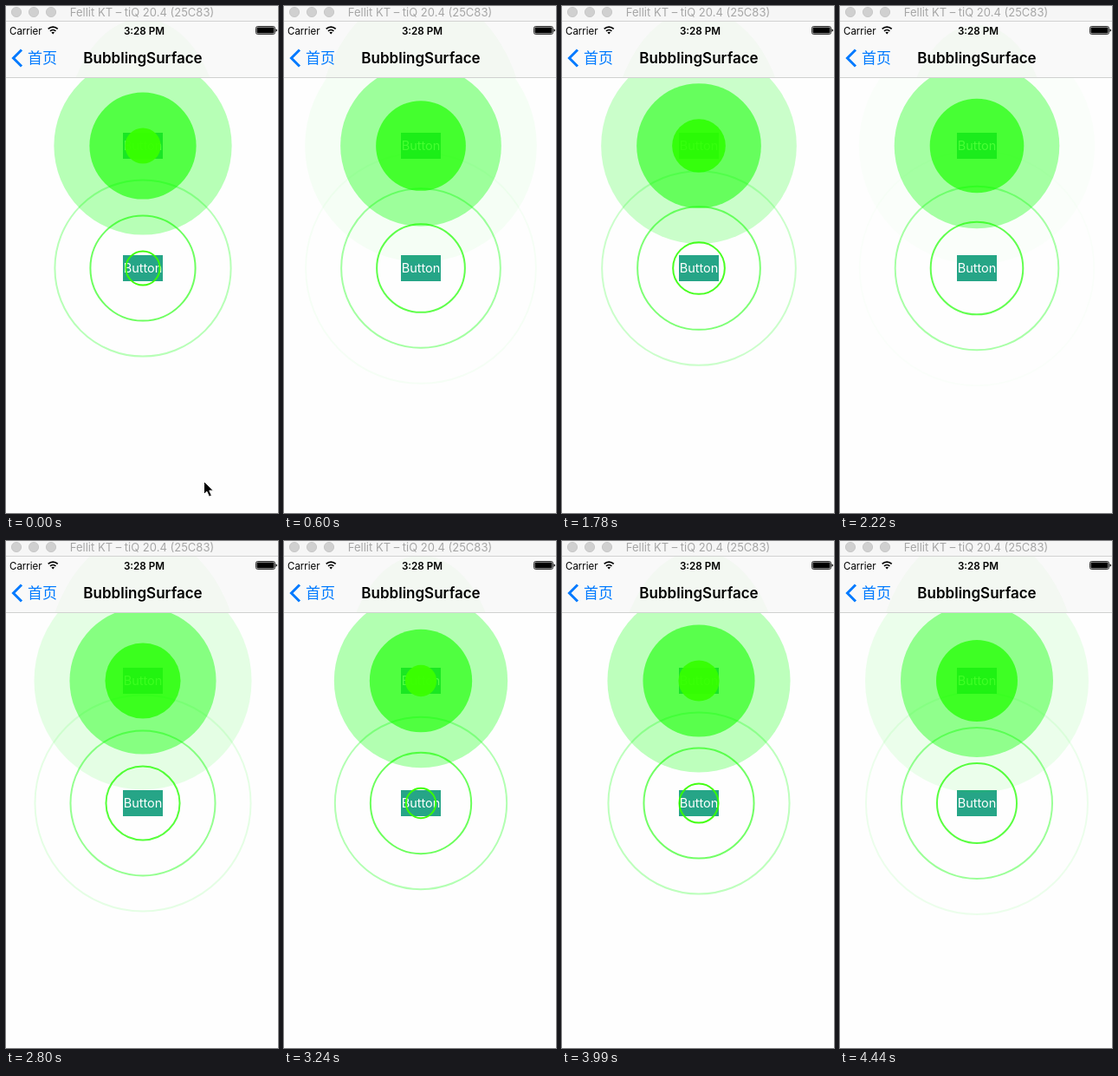
An HTML page for the animation above (4.54 s loop, 314 by 584 pixels).

```html
<!DOCTYPE html>
<html lang="en">
<head>
<meta charset="utf-8">
<title>Ripple buttons</title>
<style>
  html, body { margin: 0; width: 100%; height: 100%; overflow: hidden; background: #fefefe; }
  svg { display: block; width: 100%; height: 100%; }
  text { font-family: Inter, Roboto, sans-serif; }
  .mid { text-anchor: middle; }
  .label { font-size: 14.5px; fill: #fff; }
</style>
</head>
<body>
<svg viewBox="0 0 314 584">
  <defs>
    <clipPath id="barClip"><rect y="18" width="314" height="64"/></clipPath>
    <clipPath id="pageClip"><rect y="83" width="314" height="501"/></clipPath>
    <g id="button">
      <rect x="135" width="46" height="30" fill="#26a587"/>
      <text class="mid label" x="158" y="20.3">Button</text>
    </g>
  </defs>
  <rect width="314" height="584" fill="#fefefe"/>

  <use href="#button" y="146"/>
  <use href="#button" y="287"/>
  <g clip-path="url(#pageClip)">
    <g id="discs"></g>
    <g id="rings" fill="none" stroke-width="2"></g>
  </g>

  <!-- navigation bar -->
  <rect y="18" width="314" height="64" fill="#f9f9f9"/>
  <ellipse id="tint" cx="158" cy="161" fill="#f3f8f2" clip-path="url(#barClip)"/>
  <rect y="82" width="314" height="1" fill="#d0d1d0"/>
  <path d="M18 50.5 8.5 60 18 69.5" fill="none" stroke="#007aff" stroke-width="3"/>
  <text x="25" y="66" font-size="17" fill="#007aff" style="font-family:'Noto Sans CJK SC','Noto Sans CJK',sans-serif">首页</text>
  <text class="mid" x="158" y="66" font-size="17" font-weight="600">BubblingSurface</text>

  <!-- status bar -->
  <text x="4" y="32.5" font-size="11.5">Carrier</text>
  <g fill="none" stroke="#000" stroke-width="1.7">
    <path d="M48.7 26.4a7.8 7.8 0 0 1 11 0M51 28.9a4.6 4.6 0 0 1 6.4 0"/>
  </g>
  <path d="M52.4 30.5a2.6 2.6 0 0 1 3.6 0l-1.8 2z"/>
  <text class="mid" x="159.5" y="32.5" font-size="11.7" font-weight="600">3:28 PM</text>
  <rect x="288.5" y="23.5" width="22" height="9" rx="2" fill="#fff" stroke="#000" stroke-width=".8"/>
  <rect x="289.5" y="24.5" width="20" height="7" rx="1"/>
  <path d="M311.5 26.3q1.6.4 1.6 1.7t-1.6 1.7z"/>

  <!-- window title -->
  <rect width="314" height="18" fill="#f6f6f6"/>
  <rect y="17" width="314" height="1" fill="#d2d2d2"/>
  <g fill="#d0d0d0" stroke="#c2c2c2" stroke-width=".8">
    <circle cx="12" cy="7" r="5.6"/><circle cx="32" cy="7" r="5.6"/><circle cx="52" cy="7" r="5.6"/>
  </g>
  <text class="mid" x="157" y="12" font-size="13" fill="#a6a6a6">Fellit KT – tiQ 20.4 (25C83)</text>

  <path id="cursor" d="M228.5 547.5v15l3.4-3.2 2.6 5.9 2.9-1.2-2.6-5.8h4.6z" stroke="#fff" stroke-width="1"/>
</svg>
<script>
  const LOOP = 4540, DURATION = 2360, COUNT = 3;
  const MIN_R = 15, SPAN = 123, START_R = 20.6;
  const SHORT = [5, 7, 11, 15, 18, 22]; // ticks lasting 140 ms, the others 150
  const $ = id => document.getElementById(id);

  function circles(parent, cy) {
    return Array.from({ length: COUNT }, () => {
      const c = document.createElementNS('http://www.w3.org/2000/svg', 'circle');
      c.setAttribute('cx', 158);
      c.setAttribute('cy', cy);
      return $(parent).appendChild(c);
    });
  }

  function set(el, attrs) {
    for (const k in attrs) el.setAttribute(k, attrs[k]);
  }

  const discs = circles('discs', 161), rings = circles('rings', 302);

  const ticks = [0];
  for (let i = 0; i < 30; i++) ticks.push(ticks[i] + (SHORT.includes(i) ? 140 : 150));

  function draw(time) {
    const step = SPAN / COUNT;
    const inner = MIN_R + (START_R - MIN_R + time * SPAN / DURATION) % step;
    let tintR = 0;
    for (let i = 0; i < COUNT; i++) {
      const r = inner + (COUNT - 1 - i) * step;
      const alpha = 1 - (r - MIN_R) / SPAN;
      const color = `rgb(${Math.round(62 * alpha * alpha)},255,0)`;
      set(discs[i], { r, fill: color, 'fill-opacity': alpha });
      set(rings[i], { r: r - 1, stroke: color, 'stroke-opacity': alpha });
      if (!tintR && alpha > 0.02) tintR = r;
    }
    set($('tint'), { rx: tintR - 11, ry: tintR + 44 });
    $('cursor').style.display = time === 0 ? '' : 'none';
  }

  let origin, last;
  function loop(now) {
    origin ??= now;
    const t = (now - origin) % LOOP;
    const tick = ticks.findLast(s => s <= t);
    if (tick !== last) draw(last = tick);
    requestAnimationFrame(loop);
  }
  draw(0);
  requestAnimationFrame(loop);
</script>
</body>
</html>
```
